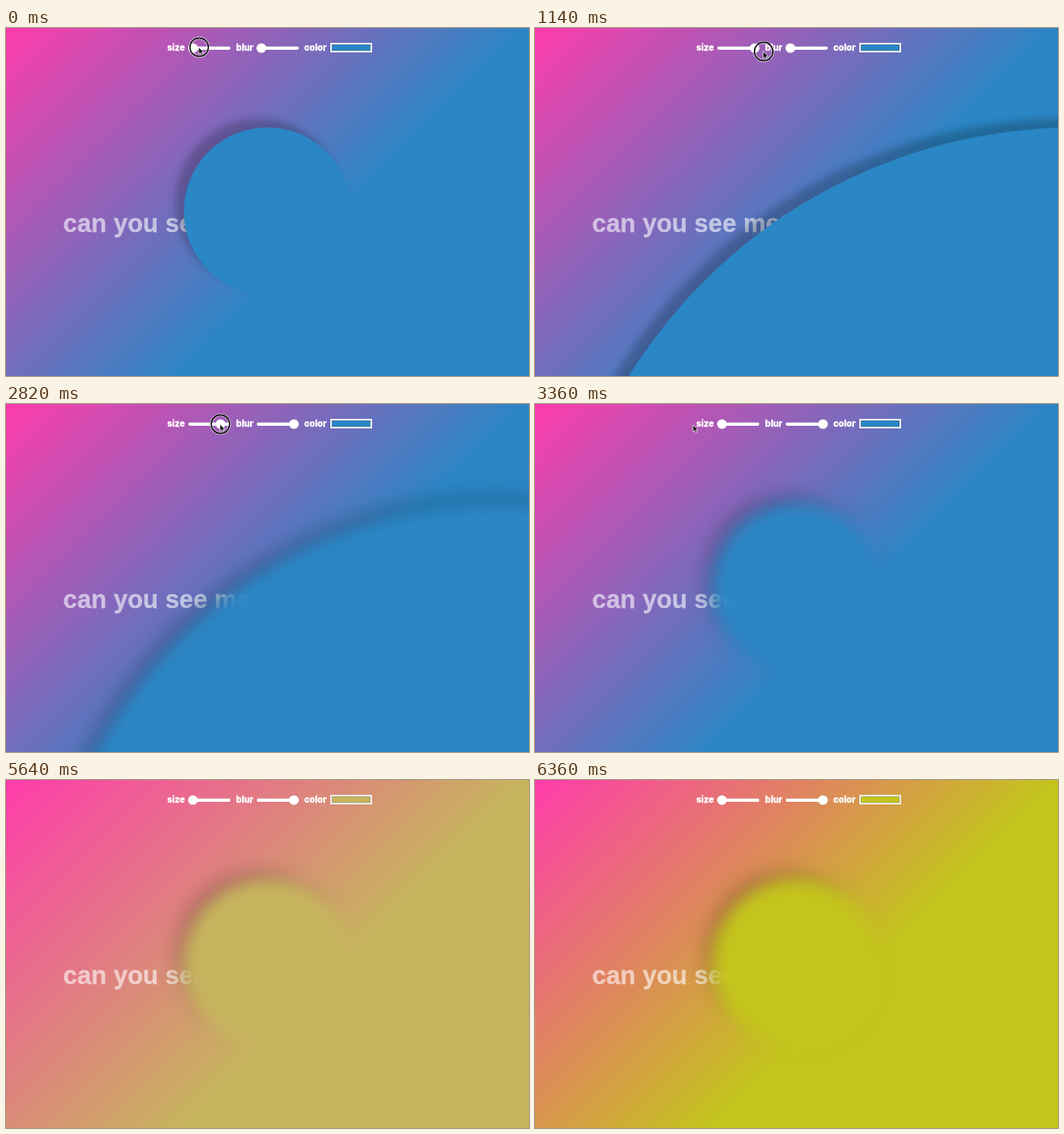
An HTML page that plays this animation: 600 px wide and 399 px high, repeating every 6.42 s.

```html
<!DOCTYPE html>
<html lang="en">
<head>
<meta charset="utf-8">
<title>Hidden text</title>
<style>
  html, body { margin: 0; width: 100%; height: 100%; overflow: hidden; }
  #stage {
    --base: rgb(43, 134, 197);
    position: relative; width: 600px; height: 399px; overflow: hidden;
    background: linear-gradient(135deg, #ff3cac, var(--base) 60%);
  }
  #disc {
    position: absolute; top: 114px; border-radius: 50%;
    background: var(--base);
    box-shadow: -10px -10px 8px rgba(0, 0, 0, .22);
  }
  svg { position: absolute; left: 0; top: 0; }
  text { font-weight: bold; fill: #fff; stroke: #fff; stroke-width: .3px; }
  .phrase { font-family: "Liberation Sans", Arial, sans-serif; font-size: 28.9px; opacity: .6; }
  .label { font-family: Inter, sans-serif; font-size: 10px; font-weight: 800; }
  .panel { filter: drop-shadow(.5px .8px .6px rgba(0, 0, 0, .3)); }
  #swatch { fill: var(--base); }
</style>
</head>
<body>
<div id="stage">
  <svg width="600" height="399"><text class="phrase" x="65.6" y="234">can you see me?</text></svg>
  <div id="disc"></div>
  <svg width="600" height="399">
    <g fill="#fff">
      <text class="label" x="185" y="25.5">size</text>
      <text class="label" x="264" y="25.5">blur</text>
      <text class="label" x="342.3" y="25.5">color</text>
      <g class="panel">
        <rect x="209" y="21.3" width="48.5" height="3.6" rx="1.8"/>
        <rect x="287.5" y="21.3" width="48.5" height="3.6" rx="1.8"/>
        <circle id="sizeThumb" cy="23" r="5.6"/>
        <circle id="blurThumb" cy="23" r="5.6"/>
        <rect x="372" y="17" width="48" height="11" fill="#f0f0f0"/>
      </g>
      <rect id="swatch" x="374" y="19" width="44" height="7" stroke="#000" stroke-opacity=".2" stroke-width=".8"/>
    </g>
    <g id="pointer">
      <g id="ring" fill="none">
        <circle r="10.6" cx=".6" stroke="#fff" stroke-opacity=".6" stroke-width="3.2"/>
        <circle r="10.6" cx=".6" stroke="#111" stroke-width="1.5"/>
      </g>
      <path d="M0 0V8L1.9 6.3 3.1 9 4.5 8.4 3.3 5.8H5.8Z" fill="#000" stroke="#fff" stroke-width=".7"/>
    </g>
  </svg>
</div>
<script>
  const LOOP = 6420, STEP = 60;
  const byId = id => document.getElementById(id);
  const mix = (a, b, k) => a + (b - a) * k;

  // Share of the span from..to that has passed, 0 to 1
  const ramp = (t, from, to) => Math.min(1, Math.max(0, (t - from) / (to - from)));
  const ease = (t, from, to) => {
    const k = ramp(t, from, to);
    return k * k * (3 - 2 * k);
  };

  // Pointer stops; the first three drags alternate with free moves
  const stops = [
    { at: 0, x: 221, y: 22 }, { at: 1200, x: 262, y: 27 },
    { at: 1500, x: 294, y: 23 }, { at: 2220, x: 358, y: 28 },
    { at: 2700, x: 253, y: 23 }, { at: 3300, x: 180, y: 24 },
    { at: 4560, x: 369, y: 17 }, { at: 5220, x: 470, y: -20 }
  ];

  function pointer(t) {
    const leg = Math.min(stops.filter(s => s.at <= t).length, stops.length - 1) - 1;
    const a = stops[leg], b = stops[leg + 1];
    const k = ease(t, a.at, b.at);
    return { x: mix(a.x, b.x, k), y: mix(a.y, b.y, k), down: leg < 5 && leg % 2 === 0 };
  }

  const blue = [43, 134, 197], sand = [199, 180, 94], lime = [196, 196, 29];

  function baseColor(t) {
    const toSand = ramp(t, 4980, 5640), toLime = ramp(t, 5640, 6360);
    return blue.map((v, i) => Math.round(mix(mix(v, sand[i], toSand), lime[i], toLime)));
  }

  function draw(t) {
    const size = ease(t, 0, 1040) - ease(t, 2700, 3180);
    const blur = ease(t, 1500, 2040);
    const radius = mix(96, 603, size);
    const disc = byId("disc").style;

    disc.width = disc.height = 2 * radius + "px";
    disc.left = mix(300, 620, size) - radius + "px";
    disc.filter = blur > 0 ? `blur(${9 * blur}px)` : "none";
    byId("stage").style.setProperty("--base", `rgb(${baseColor(t)})`);

    byId("sizeThumb").setAttribute("cx", mix(214.5, 252, size));
    byId("blurThumb").setAttribute("cx", mix(293, 330.3, blur));

    const { x, y, down } = pointer(t);
    byId("pointer").setAttribute("transform", `translate(${x} ${y})`);
    byId("ring").style.display = down ? "" : "none";
  }

  const start = performance.now();
  function tick() {
    const t = (performance.now() - start) % LOOP;
    draw(Math.floor(t / STEP) * STEP);
    requestAnimationFrame(tick);
  }
  draw(0);
  requestAnimationFrame(tick);
</script>
</body>
</html>
```
